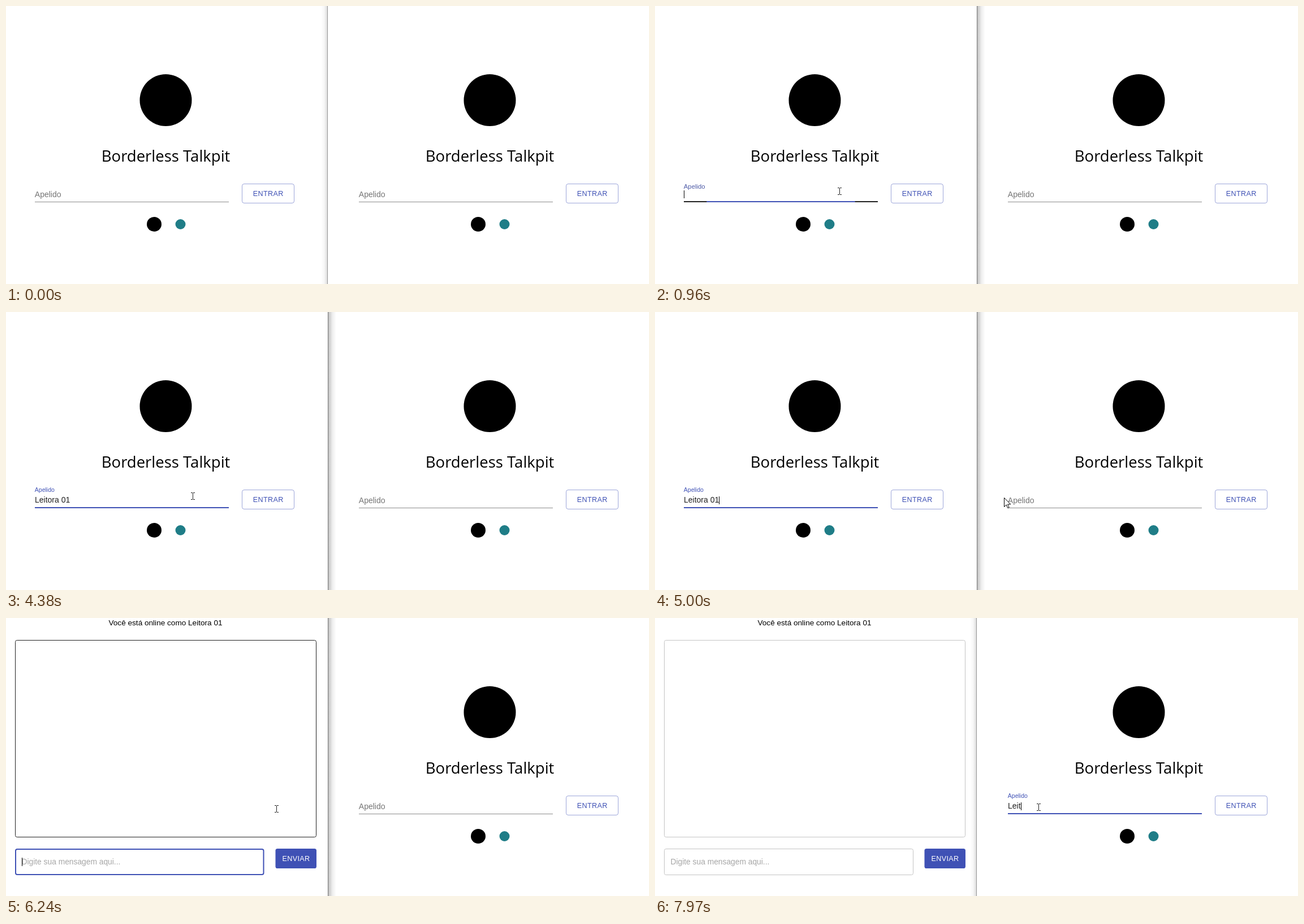
These frames come from a looping animation (1137 px wide and 493 px high, 8000 ms). An HTML page:

```html
<!DOCTYPE html>
<html lang="pt">
<head>
<meta charset="utf-8">
<title>Webchat</title>
<style>
  html, body { margin: 0; width: 100%; height: 100%; overflow: hidden; background: #fff; }
  svg { display: block; width: 1137px; height: 493px; }
  text { font-family: "Liberation Sans", Arial, sans-serif; white-space: pre; }
  .title { font: 27.5px "Open Sans", "Noto Sans", sans-serif; text-anchor: middle; }
  .button { font-size: 12.6px; letter-spacing: .36px; text-anchor: middle; }
  .typed { font-size: 14px; fill: #212121; }
  .caret { fill: #000; }
</style>
</head>
<body>
<svg id="stage" viewBox="0 0 1137 493" xmlns="http://www.w3.org/2000/svg">
  <defs>
    <linearGradient id="fade-left"><stop stop-opacity="0"/><stop offset=".5" stop-opacity=".03"/><stop offset="1" stop-opacity=".13"/></linearGradient>
    <linearGradient id="fade-right"><stop stop-opacity=".25"/><stop offset=".5" stop-opacity=".07"/><stop offset="1" stop-opacity="0"/></linearGradient>
  </defs>
  <rect width="1137" height="493" fill="#fff"/>
  <g id="logins"></g>
  <g id="chat">
    <text x="282" y="12.5" font-size="13.6" text-anchor="middle">Você está online como Leitora 01</text>
    <rect id="log" x="16.5" y="39.5" width="532" height="349" rx="3" fill="none"/>
    <rect id="message" fill="none"/>
    <text x="27.5" y="437" font-size="13.8" fill="#a6a6a6">Digite sua mensagem aqui...</text>
    <rect id="message-caret" class="caret" x="28" y="425" width="1" height="15"/>
    <rect x="476.5" y="409" width="72.5" height="35" rx="3.6" fill="#3f51b5"/>
    <text class="button" x="513" y="431" fill="#fff">ENVIAR</text>
  </g>
  <g id="left-active">
    <rect x="569" width="1" height="493" fill="#757575"/>
    <rect x="570" width="14" height="493" fill="url(#fade-right)"/>
  </g>
  <g id="right-active">
    <rect x="557" width="11" height="493" fill="url(#fade-left)"/>
    <rect x="568" width="1" height="493" fill="#959595"/>
  </g>
  <g id="cursor">
    <path id="arrow" d="M.5.5v16l3.7-3.6 2.6 5.8 2.4-1-2.6-5.7h5.2z" fill="#fff" stroke="#000"/>
    <path id="ibeam" d="M-3-5.5h3m1 0h3M.5-5v11M-3 6.5h3m1 0h3" fill="none" stroke="#222"/>
    <path id="hand" d="M-3.5 1.2q1.5-2.4 3 0v5.4q1.4-1.4 2.8.3 1.4-1 2.6.6 2.6-.8 2.8 1.8v4.2q0 2.2-1.6 3.6v1.6h-7.6v-1.6q-1.8-2-4.6-6.3-.4-2.2 1.6-1.6l1 1.2z" fill="#fff" stroke="#222"/>
  </g>
</svg>
<script>
const LOOP = 8000, PANE = 573, BLUE = '#3f51b5', NAME = 'Leitora 01';
const FOCUS_FRAMES = [880, 960, 1030, 1100], FOCUS_LAG = 5990;
const KEYS = [
  [1730, 1970, 2110, 2200, 2280, 2430, 2810, 2980, 3470, 3540],
  [7570, 7740, 7900, 7970]
];
// start, end, steps, from x/y, to x/y
const MOVES = [
  [70, 630, 8, 1072, 484, 326, 328],
  [4380, 5000, 8, 330, 326, 617, 329],
  [5170, 5620, 6, 617, 329, 478, 338],
  [6310, 6780, 6, 478, 338, 678, 335]
];

const $ = id => document.getElementById(id);
const mix = (a, b, p) => a + (b - a) * p;
const show = (el, on) => el.style.display = on ? '' : 'none';
const set = (el, attrs) => Object.entries(attrs).forEach(([k, v]) => el.setAttribute(k, v));
const inside = (p, x1, y1, x2, y2) => p.x >= x1 && p.x <= x2 && p.y >= y1 && p.y <= y2;
const blink = (t, since) => t >= since && Math.floor((t - since) / 520) % 2 === 0;

const loginMarkup = `
  <circle cx="282.5" cy="167" r="46"/>
  <text class="title" x="282.5" y="275.5">Borderless Talkpit</text>
  <rect class="line" x="51" y="347" width="343" height="1" fill="#8c8c8c"/>
  <rect class="hover" x="51" y="346" width="343" height="2" fill="#212121"/>
  <rect class="focus" y="346" height="2" fill="${BLUE}"/>
  <text class="label" x="50.8">Apelido</text>
  <text class="typed" x="51" y="338"></text>
  <rect class="caret" y="327" width="1" height="14"/>
  <rect class="frame" x="417.5" y="315.5" width="92" height="34" rx="3.6" stroke="${BLUE}"/>
  <text class="button" x="463.7" y="337" fill="${BLUE}">ENTRAR</text>
  <circle cx="262" cy="387" r="13"/>
  <circle cx="308.5" cy="387" r="9" fill="#1f7d87"/>`;
$('logins').innerHTML = [0, 1].map(i => `<g transform="translate(${i * PANE})">${loginMarkup}</g>`).join('');
const logins = [...$('logins').children].map(root => {
  const parts = { root };
  for (const n of ['line', 'hover', 'focus', 'label', 'typed', 'caret', 'frame']) parts[n] = root.querySelector('.' + n);
  return parts;
});

function pointer(t) {
  const move = MOVES.filter(m => m[0] <= t).pop();
  if (!move) return { x: -99, y: -99 };
  const [start, end, steps, x1, y1, x2, y2] = move;
  const raw = Math.min(1, (t - start) / (end - start));
  const p = Math.floor(raw * steps + 1e-6) / steps;
  const eased = p * p * (3 - 2 * p);
  return { x: mix(x1, x2, eased), y: mix(y1, y2, eased) };
}

function focusProgress(t) {
  const step = FOCUS_FRAMES.filter(f => f <= t).pop();
  return step ? 1 - (1 - Math.min(1, (step - 877) / 200)) ** 2.7 : 0;
}

function drawLogin(i, t, mouse) {
  const el = logins[i], local = { x: mouse.x - i * PANE, y: mouse.y };
  const overField = inside(local, 51, 318, 394, 348);
  const overButton = inside(local, 418, 315, 509, 350);
  const p = focusProgress(t - i * FOCUS_LAG);
  const keys = KEYS[i].filter(k => k <= t);

  show(el.hover, overField && p < 1);
  set(el.focus, { x: 222.5 - 171.5 * p, width: 343 * p });
  const rgb = [[117, 63], [117, 81], [117, 181]].map(([a, b]) => Math.round(mix(a, b, p)));
  set(el.label, { y: mix(339, 319, p), 'font-size': mix(14, 10.5, p), fill: `rgb(${rgb})` });

  el.typed.textContent = NAME.slice(0, keys.length);
  const width = keys.length ? el.typed.getComputedTextLength() : 0;
  set(el.caret, { x: 51 + Math.round(width) });
  show(el.caret, blink(t, keys.length ? keys[keys.length - 1] : 900 + i * FOCUS_LAG));

  const pressed = overButton && t >= 6100 && i === 0;
  set(el.frame, {
    'stroke-opacity': overButton ? 1 : .5,
    fill: overButton ? `rgba(63,81,181,${pressed ? .18 : .045})` : 'none'
  });
  return overField ? 'ibeam' : overButton ? 'hand' : '';
}

function drawChat(t, mouse) {
  const over = inside(mouse, 16, 39, 549, 388), focused = t < 6800;
  set($('log'), { stroke: over ? '#212121' : '#c4c4c4' });
  set($('message'), focused
    ? { x: 17, y: 410, width: 438.5, height: 45, rx: 3, stroke: BLUE, 'stroke-width': 2 }
    : { x: 16.5, y: 409.5, width: 440, height: 46, rx: 3, stroke: '#c4c4c4', 'stroke-width': 1 });
  show($('message-caret'), focused && blink(t, 6170));
  return over ? 'ibeam' : '';
}

function draw(t) {
  const mouse = pointer(t), chatting = t >= 6170;
  show(logins[0].root, !chatting);
  show($('chat'), chatting);
  const left = chatting ? drawChat(t, mouse) : drawLogin(0, t, mouse);
  const kind = drawLogin(1, t, mouse) || left || 'arrow';

  const leftActive = t >= 810 && t < 6800;
  show($('left-active'), leftActive);
  show($('right-active'), !leftActive);

  set($('cursor'), { transform: `translate(${Math.round(mouse.x)} ${Math.round(mouse.y)})` });
  for (const n of ['arrow', 'ibeam', 'hand']) show($(n), n === kind);
}

const began = performance.now();
function tick() {
  draw((performance.now() - began) % LOOP);
  requestAnimationFrame(tick);
}
tick();
</script>
</body>
</html>
```
